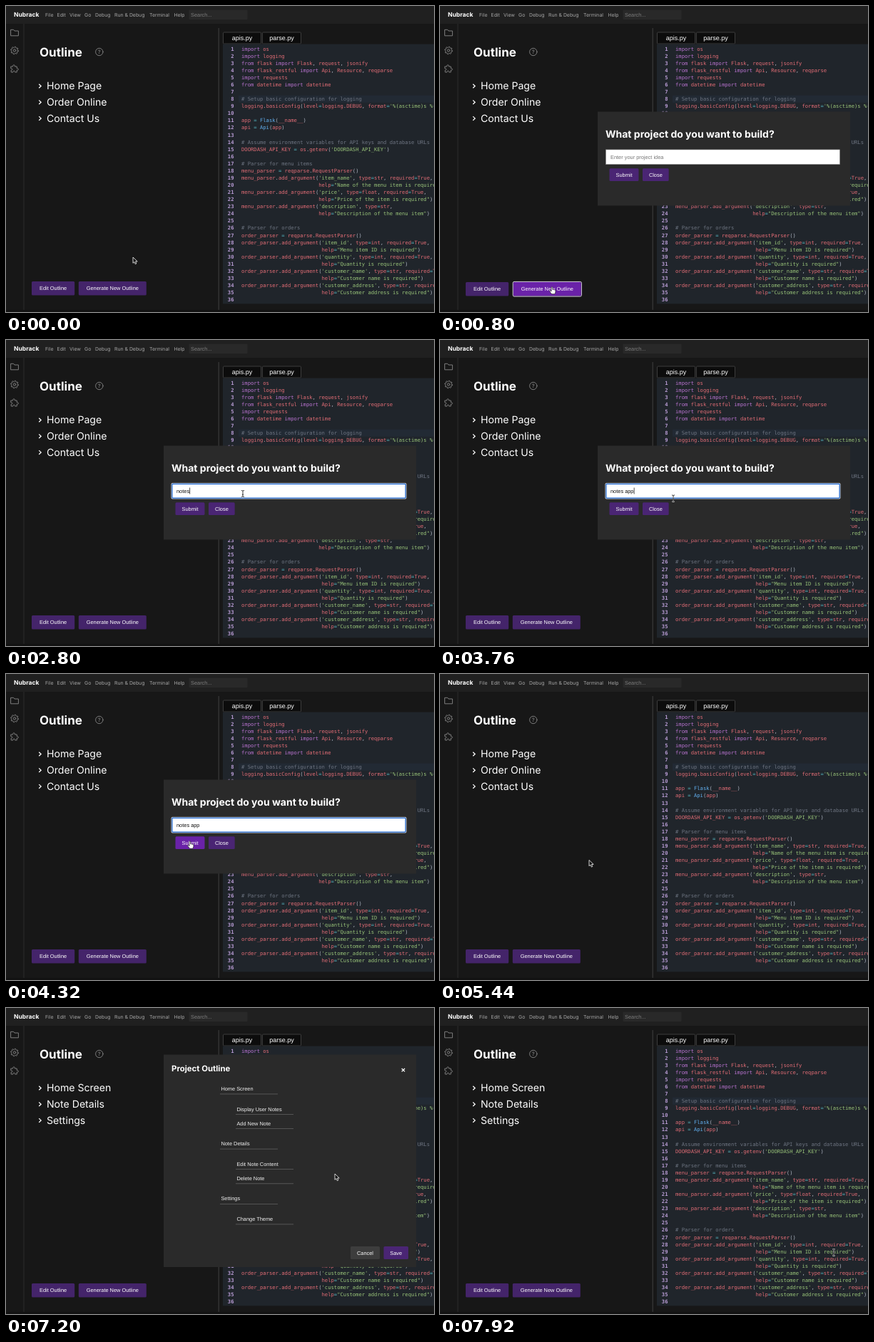
Recreate the animation shown at these times as an HTML page. Size 600 px wide and 430 px high, loop 8 s.

```html
<!DOCTYPE html>
<html lang="en">
<head>
<meta charset="utf-8">
<title>Code editor demo</title>
<style>
html, body { margin: 0; width: 100%; height: 100%; overflow: hidden; background: #171717; }
svg { display: block; width: 600px; height: 430px; text-rendering: geometricPrecision; }
text { white-space: pre; }
.ui { font-family: Inter, "Open Sans", sans-serif; }
.arial { font-family: "Liberation Sans", Arial, sans-serif; font-size: 7.4px; }
.code { font-family: "DejaVu Sans Mono", monospace; font-size: 7.19px; fill: #abb2bf; }
.num { font-weight: 700; fill: #b79bd3; }
.comment { fill: #6d7481; }
.string { fill: #98c379; }
.keyword { fill: #b973d0; }
.op { fill: #56b6c2; }
.call { fill: #61afef; }
.name { fill: #e06c75; }
.icon { fill: none; stroke: #7d7d7d; stroke-width: 1; stroke-linejoin: round; stroke-linecap: round; }
</style>
</head>
<body>
<svg id="stage" viewBox="0 0 600 430"></svg>
<script>
const LOOP = 8000, STEP = 80;
const PURPLE = '#44246a', BRIGHT = '#6a22a8';
const stage = document.getElementById('stage');

function add(parent, tag, attrs = {}, content) {
  const el = document.createElementNS('http://www.w3.org/2000/svg', tag);
  for (const key in attrs) el.setAttribute(key, attrs[key]);
  if (content !== undefined) el.textContent = content;
  parent.appendChild(el);
  return el;
}
const group = parent => add(parent, 'g');
const rect = (parent, x, y, width, height, fill, more) =>
  add(parent, 'rect', { x, y, width, height, fill, ...more });
const path = (parent, d, more) => add(parent, 'path', { d, ...more });
const arial = (parent, x, y, str, fill = '#fff', more) =>
  add(parent, 'text', { x, y, fill, class: 'arial', ...more }, str);
const ui = (parent, x, y, size, str, fill = '#fff', weight = 400) =>
  add(parent, 'text', { x, y, fill, class: 'ui', 'font-size': size, 'font-weight': weight }, str);

function button(parent, x, y, w, h, label, fill = PURPLE) {
  const el = group(parent);
  const box = rect(el, x, y, w, h, fill, { rx: 1.6 });
  arial(el, x + w / 2, y + h / 2 + 2.6, label, '#fff', { 'text-anchor': 'middle' });
  return { el, box, x, y, w, h, fill };
}

// Header and sidebar
rect(stage, 0, 0, 600, 430, '#171717');
rect(stage, 0, 0, 600, 25, '#202020');
ui(stage, 11, 15.2, 8.5, 'Nubrack', '#fff', 700);
const menu = [['File', 55], ['Edit', 71.5], ['View', 89], ['Go', 110], ['Debug', 125],
  ['Run & Debug', 152], ['Terminal', 201], ['Help', 235.5]];
for (const [label, x] of menu) ui(stage, x, 15.3, 6.9, label, '#a6a6a6');
rect(stage, 256.5, 5.5, 82, 13.5, '#292929', { rx: 1 });
arial(stage, 259, 14.8, 'Search...', '#7d7d7d');
rect(stage, 24.5, 25, 1, 402, '#2c2c2c');
rect(stage, 0, 427, 600, 3, '#121212');
rect(stage, 297.5, 31, 1.5, 396, '#333');

const icons = group(stage);
icons.setAttribute('class', 'icon');
path(icons, 'M7 33.3h3.6l1.4 1.7h5.4v6.8H7z');
add(icons, 'circle', { cx: 12, cy: 62.5, r: 1.7 });
const cog = [];
for (let i = 0; i < 32; i++) {
  const a = (i + 0.5) / 32 * Math.PI * 2, r = i % 4 < 2 ? 5.4 : 4.1;
  cog.push(`${12 + r * Math.cos(a)},${62.5 + r * Math.sin(a)}`);
}
add(icons, 'polygon', { points: cog.join(' ') });
path(icons, 'M7.2 85h2.6c-.9-2.9 3.3-2.9 2.5 0h2.9v2.7c2.9-.9 2.9 3.3 0 2.4v2.9h-2.7c.6-2.6-3-2.6-2.5 0H7.2v-2.8c2.4.5 2.4-2.9 0-2.4z');

// Outline panel
ui(stage, 47, 71.3, 17, 'Outline', '#fff', 700);
add(stage, 'circle', { cx: 130.8, cy: 64.5, r: 5.2, class: 'icon' });
ui(stage, 128.8, 67.2, 7.4, '?', '#858585', 500);
const oldItems = ['Home Page', 'Order Online', 'Contact Us'];
const newItems = ['Home Screen', 'Note Details', 'Settings'];
const items = oldItems.map((label, i) => {
  const y = 112.5 + i * 22.7;
  path(stage, `M46.2 ${y - 2.8}l2.9 2.8l-2.9 2.8`, { fill: 'none', stroke: '#fff', 'stroke-width': 1.3 });
  return ui(stage, 57, y + 4.8, 14.1, label);
});
const edit = button(stage, 36, 387, 60.2, 19.5, 'Edit Outline');
const generate = button(stage, 101.8, 387, 95, 19.5, 'Generate New Outline');
const ring = rect(generate.el, 101.2, 386.4, 96.2, 20.7, 'none', { rx: 1.8, stroke: '#d8d0e4', 'stroke-width': 1 });

// Code panel
for (const [x, w, label] of [[304, 54, 'apis.py'], [359, 55, 'parse.py']]) {
  rect(stage, x + .5, 37, w - 1, 16, '#0c0c0c', { rx: 1, stroke: '#3c3c3c', 'stroke-width': 1 });
  arial(stage, x + w / 2, 48, label, '#fff', { 'text-anchor': 'middle', style: 'font-size:9px' });
}
rect(stage, 304, 53.5, 296, 365, '#20252b');
rect(stage, 326, 125.6, 274, 10.1, '#222a34');

const arg = (who, name, type, tail, help) => {
  const call = `${who}_parser.add_argument(`;
  return [`${call}'${name}', type=${type},${tail}`, `${' '.repeat(call.length)}help="${help}")`];
};
const need = ' required=True,';
const lines = [
  'import os', 'import logging', 'from flask import Flask, request, jsonify',
  'from flask_restful import Api, Resource, reqparse', 'import requests',
  'from datetime import datetime', '',
  '# Setup basic configuration for logging',
  "logging.basicConfig(level=logging.DEBUG, format='%(asctime)s %(levelname)s')", '',
  'app = Flask(__name__)', 'api = Api(app)', '',
  '# Assume environment variables for API keys and database URLs',
  "DOORDASH_API_KEY = os.getenv('DOORDASH_API_KEY')", '',
  '# Parser for menu items', 'menu_parser = reqparse.RequestParser()',
  ...arg('menu', 'item_name', 'str', need, 'Name of the menu item is required'),
  ...arg('menu', 'price', 'float', need, 'Price of the item is required'),
  ...arg('menu', 'description', 'str', '', 'Description of the menu item'), '',
  '# Parser for orders', 'order_parser = reqparse.RequestParser()',
  ...arg('order', 'item_id', 'int', need, 'Menu item ID is required'),
  ...arg('order', 'quantity', 'int', need, 'Quantity is required'),
  ...arg('order', 'customer_name', 'str', need, 'Customer name is required'),
  ...arg('order', 'customer_address', 'str', need, 'Customer address is required'), ''
];
const kinds = ['comment', 'string', 'keyword', 'op', 'call', 'name', 'plain'];
const token = /(#.*)|("[^"]*"|'[^']*')|\b(import|from)\b|(=)|((?<!\.)\b[A-Z]\w*(?=\())|([A-Za-z_]\w*)|([^\w=#'"]+)/g;
lines.forEach((line, i) => {
  const y = 62.7 + i * 10.07;
  add(stage, 'text', { x: 319.5, y, class: 'code num', 'text-anchor': 'end' }, i + 1);
  const row = add(stage, 'text', { x: 330, y, class: 'code' });
  for (const m of line.matchAll(token)) {
    add(row, 'tspan', { class: kinds[m.slice(1).findIndex(s => s !== undefined)] }, m[0]);
  }
});

// Project prompt
const ask = group(stage);
rect(ask, 221, 148.5, 354, 132, '#2a2a2a');
ui(ask, 232, 185, 14, 'What project do you want to build?', '#fff', 700);
rect(ask, 232.5, 201.9, 328, 20.6, '#fff', { stroke: '#8a8a8a', 'stroke-width': .6 });
const focusRing = group(ask);
rect(focusRing, 232, 201.4, 329, 21.6, 'none', { rx: 1.2, stroke: '#fff', 'stroke-width': .8 });
rect(focusRing, 232.9, 202.3, 327.2, 19.8, 'none', { rx: .8, stroke: '#1b66d2', 'stroke-width': 1.2 });
const field = arial(ask, 239, 214.7, '');
const caret = rect(ask, 239, 207.5, .7, 9, '#000');
const submit = button(ask, 237.5, 228.3, 41, 17.8, 'Submit', '#4a2574');
const close = button(ask, 284, 228.3, 36.7, 17.8, 'Close', '#4a2574');

// Generated outline
const result = group(stage);
rect(result, 221, 65.5, 354, 298.5, '#2a2a2a');
ui(result, 232, 88.5, 11.4, 'Project Outline', '#fff', 700);
path(result, 'M554.7 85l4.4 4.4m0-4.4l-4.4 4.4', { stroke: '#fff', 'stroke-width': 1.3 });
const entries = [['Home Screen', 113.3], ['Display User Notes', 142, 1], ['Add New Note', 162, 1],
  ['Note Details', 190.5], ['Edit Note Content', 219, 1], ['Delete Note', 239.2, 1],
  ['Settings', 267.8], ['Change Theme', 296.3, 1]];
for (const [label, y, deep = 0] of entries) {
  const x = 300 + deep * 22;
  arial(result, x + 1.4, y + 2.6, label, '#f2f2f2');
  rect(result, x, y + 7.2, 81, .8, '#606060');
}
button(result, 483, 335, 41, 18, 'Cancel', '#3d3d3d');
const save = button(result, 529.5, 335, 34.5, 18, 'Save', '#4a2574');

// Pointers, each drawn around its hot spot
const dark = { fill: '#111', stroke: '#fff', 'stroke-width': .8, 'stroke-linejoin': 'round' };
const light = { ...dark, fill: '#fff', stroke: '#111', 'stroke-width': .6 };
const pointer = group(stage);
const shapes = { arrow: group(pointer), hand: group(pointer), beam: group(pointer) };
path(shapes.arrow, 'M0 0V8.3L1.9 6.6L3.3 9.7L4.8 9L3.5 6H6.2Z', dark);
path(shapes.hand, 'M-.9 -2.4q.9-1.2 1.7 0V1q1-.7 1.5.2q1-.5 1.4.4q1.1-.3 1.2.8V4.4L4 7.2H-.4L-3.3 3.4q-.2-1.3 1.1-.9L-.9 3.5Z', light);
const beam = 'M-2-4.6Q0-4.6 0-3.4Q0-4.6 2-4.6M0-3.4V3.4M-2 4.6Q0 4.6 0 3.4Q0 4.6 2 4.6M-1 1.2H1';
path(shapes.beam, beam, { fill: 'none', stroke: '#fff', 'stroke-width': 1.7, opacity: .75 });
path(shapes.beam, beam, { fill: 'none', stroke: '#111', 'stroke-width': .8 });

// Timeline
const T = { ask: 640, focus: 1680, type: 2160, key: 160, submit: 4640, result: 6400, saved: 7760 };
const typed = 'notes app';
const track = [[0, 178, 353], [80, 178, 353], [560, 157, 397.5], [960, 157, 397.5], [1600, 332, 216],
  [3600, 332, 216], [3760, 327, 222.5], [4240, 258, 238], [4720, 258, 238], [5280, 209, 261.5],
  [6480, 209, 261.5], [7120, 461, 233], [7200, 461, 233], [7600, 550, 343], [7840, 552, 343.5], [LOOP, 552, 343.5]];

function locate(t) {
  const i = track.findIndex(p => p[0] > t);
  const [t0, x0, y0] = track[i - 1], [t1, x1, y1] = track[i];
  const k = (t - t0) / (t1 - t0), e = k * k * (3 - 2 * k);
  return [x0 + (x1 - x0) * e, y0 + (y1 - y0) * e];
}
const show = (el, on) => { el.style.display = on ? '' : 'none'; };
const move = (el, x, y) => el.setAttribute('transform', `translate(${x.toFixed(2)} ${y.toFixed(2)})`);

function draw(t) {
  const asking = t >= T.ask && t < T.submit;
  const done = t >= T.result && t < T.saved;
  const focused = asking && t >= T.focus;
  const ringed = asking && !focused;
  const [x, y] = locate(t);
  show(ask, asking);
  show(result, done);
  show(focusRing, focused);
  items.forEach((el, i) => { el.textContent = (t < T.result ? oldItems : newItems)[i]; });

  // The focus border enlarges its button and nudges the row
  const nudge = ringed ? 1 : 0;
  show(ring, ringed);
  move(edit.el, 0, nudge);
  move(generate.el, nudge, nudge);

  const count = Math.max(0, Math.min(typed.length, Math.floor((t - T.type) / T.key) + 1));
  field.textContent = count ? typed.slice(0, count) : 'Enter your project idea';
  field.setAttribute('fill', count ? '#111' : '#757575');
  const last = count ? T.type + (count - 1) * T.key : T.focus;
  show(caret, focused && Math.floor((t - last) / 500) % 2 === 0);
  if (asking) caret.setAttribute('x', count ? 239.3 + field.getComputedTextLength() : 238.8);

  let hover = false;
  for (const [b, active] of [[generate, true], [submit, asking], [close, asking], [save, done]]) {
    const over = active && x >= b.x && x <= b.x + b.w && y >= b.y && y <= b.y + b.h;
    b.box.setAttribute('fill', over ? BRIGHT : b.fill);
    hover = hover || over;
  }
  const inField = asking && x > 232 && x < 561 && y > 201 && y < 224;
  const inCode = !asking && !done && x > 326 && y > 54 && y < 418;
  const kind = hover ? 'hand' : inField || inCode ? 'beam' : 'arrow';
  for (const name in shapes) show(shapes[name], name === kind);
  move(pointer, x, y);
}

const start = performance.now();
function tick() {
  const t = (performance.now() - start) % LOOP;
  draw(Math.floor(t / STEP) * STEP);
  requestAnimationFrame(tick);
}
tick();
</script>
</body>
</html>
```
